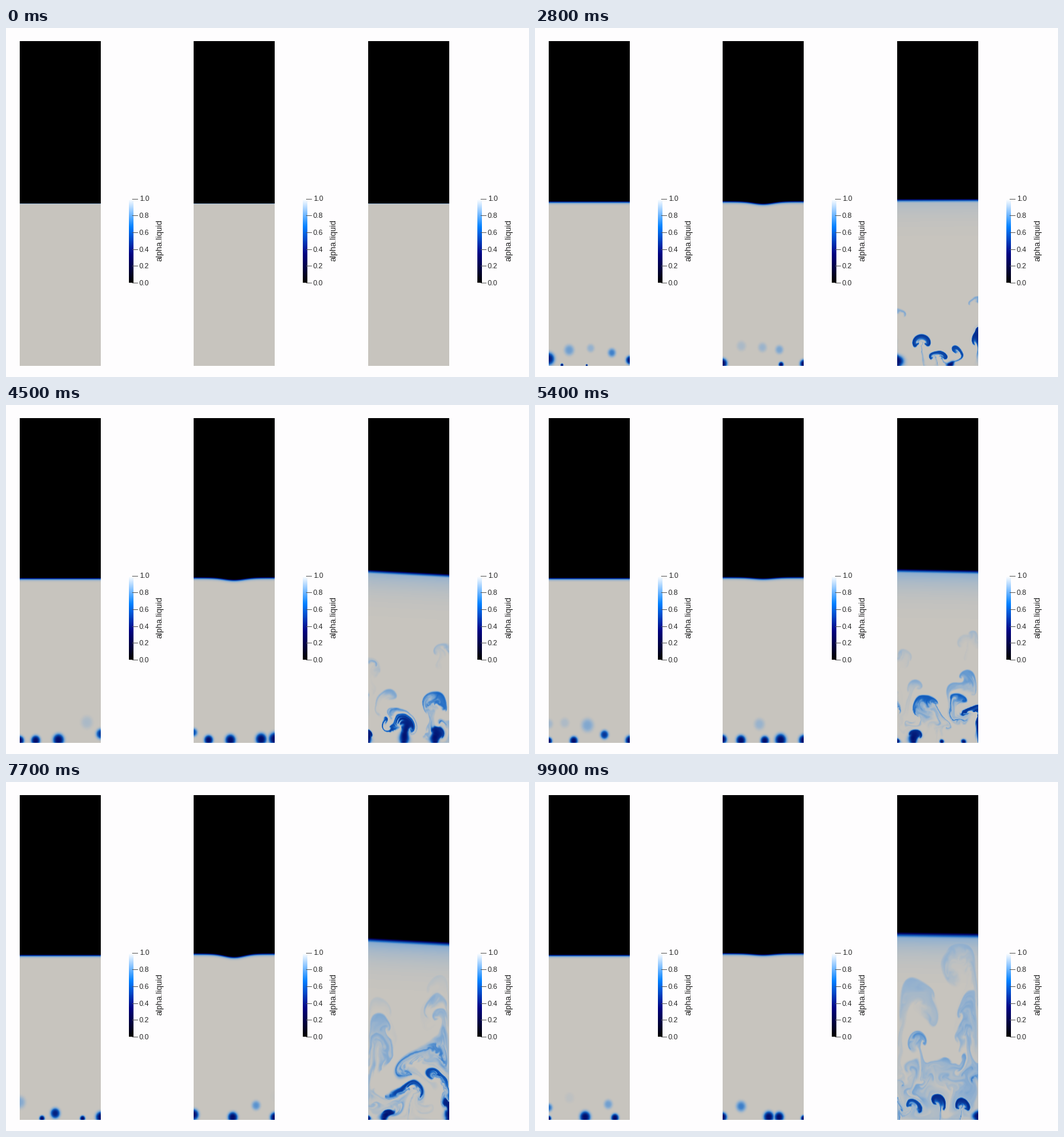
Recreate the animation shown at these times as a matplotlib script. Size 800 by 533 pixels, loop 10 s.

```python
import numpy as np
import matplotlib.pyplot as plt
from matplotlib.animation import FuncAnimation
from matplotlib.colors import LinearSegmentedColormap
from matplotlib.patches import Rectangle

W, H, DPI = 800, 533, 100
FPS, FRAMES = 10, 100
LEFTS = (21, 287, 554)
TANK_W, TOP, SPLIT, FLOOR = 124, 20, 215, 516
REST = 268          # liquid level at the start
CORE = 0.62         # gas content of a fresh bubble

X = np.arange(TANK_W) + 0.5
Y = np.arange(SPLIT, FLOOR)[:, None] + 0.5


def rgb(*c):
    return tuple(v / 255 for v in c)


BAR = LinearSegmentedColormap.from_list(
    "bar", [(0, "black"), (1 / 3, (0, 0, 0.5)), (2 / 3, (0, 0.5, 1)), (1, "white")])
GAS = LinearSegmentedColormap.from_list("gas", [
    (0, rgb(199, 196, 190)), (0.1, rgb(150, 178, 206)), (0.2, rgb(102, 154, 208)),
    (0.33, rgb(24, 102, 196)), (0.5, rgb(6, 48, 145)), (0.67, rgb(0, 0, 92)),
    (0.9, "black"), (1, "black")])


def smooth(p):
    p = np.clip(p, 0, 1)
    return p * p * (3 - 2 * p)


def settle(t, tau):
    return 1 - np.exp(-t / tau)


# ---- bubbles ----
def births(tank):
    """Bubbles as (time, x, radius): five lanes, the outer two on the walls."""
    rng = np.random.default_rng(7 + tank)
    out = []
    for lane in range(5):
        inner = 0 < lane < 4
        t = 0.8 + 0.7 * inner + rng.uniform(0, 0.3)
        while t < FRAMES / FPS:
            x = lane * TANK_W / 4 + inner * rng.uniform(-11, 11)
            out.append((t, x, rng.uniform(5, 8.5) + 2 * (tank == 2)))
            t += rng.uniform(0.9, 1.6)
    return out


BIRTHS = [births(k) for k in range(3)]


def blob(y, x0, y0, rx, ry):
    d2 = ((X - x0) / rx) ** 2 + ((y - y0) / ry) ** 2
    return np.exp(-0.8 * d2 ** 1.6)


def draw_bubbles(g, tank, t):
    """Domes grow on the floor, let go, rise a little and dissolve."""
    y, low = Y[-110:], g[-110:]
    for t0, x, r in BIRTHS[tank]:
        age = t - t0
        if 0 < age < 1.4:
            size = r * min(1, (age / 0.3) ** 0.5)
            y0 = FLOOR - 0.6 * size - 40 * max(age - 0.5, 0) ** 1.4
            s = CORE * (1 - smooth((age - 0.6) / 0.8))
            np.maximum(low, s * blob(y, x, y0, size, 1.1 * size), out=low)


# ---- buoyant flow of the right tank ----
ROWS, STEPS = 264, 2
BUOYANCY, DRAG, FASTEST = 2000, 0.5, 150
HAZE, DISSOLVE = 0.12, 0.7


def sine_basis(n):
    k = np.arange(1, n + 1)
    return np.sqrt(2 / (n + 1)) * np.sin(np.pi * np.outer(k, k) / (n + 1))


def simulate():
    """Gas in the liquid for every frame: vorticity and gas carried by the flow."""
    dt = 1 / FPS / STEPS
    sy, sx = sine_basis(ROWS), sine_basis(TANK_W)
    ky = np.pi * np.arange(1, ROWS + 1)[:, None] / (ROWS + 1)
    kx = np.pi * np.arange(1, TANK_W + 1) / (TANK_W + 1)
    inverse = 1 / (kx ** 2 + ky ** 2)
    row, col = np.mgrid[:ROWS, :TANK_W].astype(float)
    gas, spin = np.zeros((2, ROWS, TANK_W))
    frames = []
    for step in range(FRAMES * STEPS):
        if step % STEPS == 0:
            frames.append(gas.copy())
        t = step * dt
        for t0, x, r in BIRTHS[2]:
            age = t - t0
            if 0 <= age < 0.6:
                size = r * min(1, (0.05 + age) / 0.3)
                dome = blob(row, x, ROWS - 0.5 * size, size, 1.1 * size)
                gas = np.maximum(gas, CORE * dome)

        spin = spin * (1 - DRAG * dt) - dt * BUOYANCY * np.gradient(gas, axis=1)
        stream = sy @ ((sy @ spin @ sx) * inverse) @ sx
        u, v = np.gradient(stream, axis=0), -np.gradient(stream, axis=1)
        u, v = (np.clip(c, -FASTEST, FASTEST) for c in (u, v))

        r = np.clip(row - v * dt, 0, ROWS - 1.001)
        c = np.clip(col - u * dt, 0, TANK_W - 1.001)
        i, j = r.astype(int), c.astype(int)
        a, b = r - i, c - j

        def carry(f):
            return ((1 - a) * ((1 - b) * f[i, j] + b * f[i, j + 1])
                    + a * ((1 - b) * f[i + 1, j] + b * f[i + 1, j + 1]))

        gas, spin = carry(gas), carry(spin)
        gas -= dt * DISSOLVE * np.maximum(gas - HAZE, 0)
    return frames


FLOW = simulate()


def swollen_level(t):
    return REST - 2.6 * t - 0.145 * t * t


def flow_gas(frame):
    """Simulated gas stretched between the risen surface and the floor."""
    level = swollen_level(frame / FPS)
    f = FLOW[frame]
    r = np.clip((Y[:, 0] - level) / (FLOOR - level) * (ROWS - 1), 0, ROWS - 1.001)
    i = r.astype(int)
    a = (r - i)[:, None]
    return (1 - a) * f[i] + a * f[i + 1]


# ---- surface ----
def surface(tank, t):
    """Level of the liquid, thickness of its edge, strength of the froth below."""
    u = (X - TANK_W / 2) * 2 / TANK_W
    edge = 0.3 + 2.6 * settle(t, 0.8)
    if tank == 0:
        return REST - 5.5 * settle(t, 1.6) + 0 * u, edge, 0
    if tank == 1:
        dip = (3.7 + 1.6 * np.cos(1.5 * (t - 7.7))) * settle(t, 1.5)
        level = REST - 1.2 * settle(t, 0.8) - 7.5 * settle(t, 4)
        return level + dip * np.exp(-(u / 0.35) ** 2), edge, 0
    tilt = (1.5 + 1.8 * np.cos(np.pi * (t - 4.5) / 1.6)) * min(t / 4, 1) ** 2
    return swollen_level(t) + tilt * u, edge + 0.4 * t, 0.2 * smooth(t / 7)


def gas(tank, frame):
    t = frame / FPS
    level, edge, froth = surface(tank, t)
    depth = np.maximum(Y - level, 0)
    if tank == 2:
        g = np.maximum(flow_gas(frame), froth * np.exp(-depth / 20))
    else:
        g = np.zeros((len(Y), TANK_W))
        draw_bubbles(g, tank, t)
    return np.maximum(g, np.exp(-(depth / edge) ** 1.6))


# ---- stage ----
fig = plt.figure(figsize=(W / DPI, H / DPI), dpi=DPI, facecolor="#fefdfe")
ax = fig.add_axes([0, 0, 1, 1])


def px(size):
    return size * 72 / DPI


def legend(x):
    ax.imshow(np.linspace(1, 0, 128)[:, None], cmap=BAR, vmin=0, vmax=1, aspect="auto",
              extent=(x, x + 7, 389, 261))
    style = dict(color="#222222", family="Liberation Sans")
    for i in range(6):
        y = 389 - i * 25.7
        ax.plot([x + 5, x + 13], [y, y], color="#555555", lw=px(0.9))
        ax.text(x + 16, y, f"{i / 5:.1f}", size=px(11), va="center_baseline", **style)
    ax.text(x + 48, 324, "alpha.liquid", size=px(12.5), rotation=90,
            ha="center", va="center", **style)


images = []
for tank, left in enumerate(LEFTS):
    ax.add_patch(Rectangle((left, TOP), TANK_W, SPLIT - TOP + 1, color="black", lw=0))
    images.append(ax.imshow(gas(tank, 0), cmap=GAS, vmin=0, vmax=1, aspect="auto",
                            interpolation="nearest",
                            extent=(left, left + TANK_W, FLOOR, SPLIT)))
    legend(left + 167)
ax.set_xlim(0, W)
ax.set_ylim(H, 0)
ax.axis("off")


def update(frame):
    for tank, im in enumerate(images):
        im.set_data(gas(tank, frame))
    return images


anim = FuncAnimation(fig, update, frames=FRAMES, interval=1000 / FPS,
                     repeat=True, repeat_delay=0)
plt.show()
```
